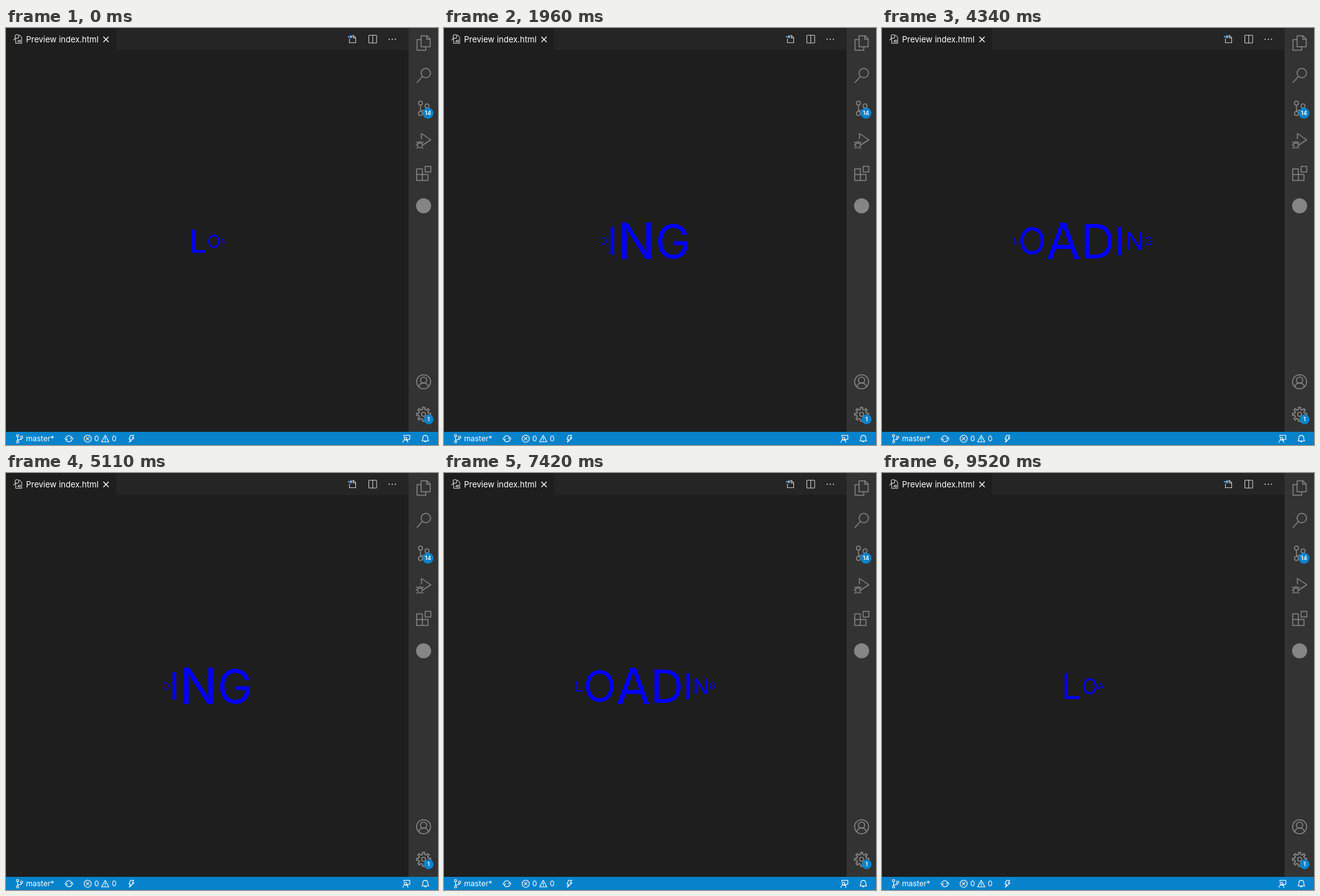
Write an HTML page that moves like this. It is 690 px wide and 666 px high and loops after 9.59 s.

```html
<!DOCTYPE html>
<html lang="en">
<head>
<meta charset="utf-8">
<title>Loading</title>
<style>
  html, body { margin: 0; width: 100%; height: 100%; overflow: hidden; background: #1e1e1e; }
  svg { display: block; width: 690px; height: 666px; font-family: Inter, "Open Sans", sans-serif; }
  .icon { fill: none; stroke-linecap: round; stroke-linejoin: round; }
  .side { stroke: #858585; stroke-width: 1.5; }
  .tool { stroke: #c9c9c9; stroke-width: 1.1; stroke-linecap: butt; }
  .status { stroke: #fff; stroke-width: 1.1; }
  .badge { fill: #0783cb; }
  .count { fill: #fff; font-size: 9px; font-weight: 600; text-anchor: middle; }
  #word { fill: #00f; text-anchor: middle; text-rendering: geometricPrecision; }
</style>
</head>
<body>
<svg viewBox="0 0 690 666">
  <rect width="690" height="666" fill="#1e1e1e"/>
  <rect x="176" width="467" height="35" fill="#252526"/>
  <rect x="643" width="47" height="645" fill="#333"/>
  <rect y="645" width="690" height="21" fill="#0783cb"/>

  <!-- tab -->
  <text x="32" y="23" font-size="13" fill="#fff">Preview index.html</text>
  <g class="icon tool">
    <path d="M15.5 16V24.5H25V15L22 11.5H20M18 22.5L20 20M20.5 19.5H23V22.5H20.5Z"/>
    <circle cx="17.5" cy="13.5" r="3"/>
    <path d="M15.5 16L12 19.5"/>
    <path d="M155.5 14L164 22.5M164 14L155.5 22.5" stroke="#fff" stroke-width="1.3"/>
  </g>

  <!-- toolbar -->
  <g class="icon tool">
    <path d="M548.5 17V23.5H558.5V15.5L555 12H553M554.5 12V16H558.5"/>
    <path d="M546 14H552.5M550 11.5L552.5 14L550 16.5" stroke="#75beff" stroke-width="1.4"/>
    <rect x="579.5" y="11.5" width="12.5" height="12.5" rx="1"/>
    <path d="M585.75 11.5V24"/>
  </g>
  <g fill="#c9c9c9">
    <circle cx="612" cy="18" r="1.1"/><circle cx="617" cy="18" r="1.1"/><circle cx="622" cy="18" r="1.1"/>
  </g>

  <!-- activity bar -->
  <g class="icon side">
    <path d="M663 12.5H672.5L677.5 17.5V30H663ZM672 12.5V18H677.5M663 18.5H656.5V35.5H670.5V30"/>
    <circle cx="670.5" cy="72" r="7.5"/><path d="M665 77.5L656.5 87"/>
    <circle cx="662" cy="120" r="3.2"/><circle cx="662" cy="136.5" r="3.2"/><circle cx="672.5" cy="124.5" r="3.2"/>
    <path d="M662 123.2V133.3M672.5 127.7Q672 131.5 668 131.5H666Q662.5 131.5 662 133.3"/>
    <path d="M663.5 177V168.5L678.5 178.5L667 186"/>
    <path d="M657.5 184H664.5V187.5A3.5 4 0 0 1 657.5 187.5ZM658.5 184A2.5 2.7 0 0 1 663.5 184M655.5 182L657.5 184M666.5 182L664.5 184M655 187H657.5M664.5 187H667M656 192L658.3 190M666 192L663.7 190" stroke-width="1.3"/>
    <path d="M656 225H665V234H674V243.5H656ZM656 234H665V243.5M669.5 221H678.5V230H669.5Z"/>
    <circle cx="667" cy="565" r="11.2"/><circle cx="667" cy="562.5" r="5"/>
    <path d="M659.5 573A7.6 7.6 0 0 1 674.5 573"/>
    <circle cx="667" cy="617" r="3.2"/><path id="gear" stroke-width="1.8"/>
  </g>
  <circle cx="667" cy="284" r="12" fill="#858585"/>
  <circle class="badge" cx="674" cy="136" r="8.7"/><text class="count" x="674" y="139.3">14</text>
  <circle class="badge" cx="675" cy="625" r="7.8"/><text class="count" x="675" y="628.3">1</text>

  <!-- status bar -->
  <g fill="#fff" font-size="12">
    <text x="32" y="660">master*</text><text x="141" y="660">0</text><text x="169" y="660">0</text>
  </g>
  <g class="icon status">
    <circle cx="18.5" cy="651" r="1.8"/><circle cx="18.5" cy="661" r="1.8"/><circle cx="25" cy="653.5" r="1.8"/>
    <path d="M18.5 652.8V659.2M25 655.3Q24.5 657.5 21.5 657.5Q19 657.5 18.5 659.2"/>
    <path d="M95.5 655A5 5 0 0 1 105 654.5M105.5 657A5 5 0 0 1 96 657.7M103 656L105.5 654L107 656.5M94 655.5L96 658L98 656"/>
    <circle cx="130.5" cy="656" r="5.7"/><path d="M128.3 653.8L132.7 658.2M132.7 653.8L128.3 658.2"/>
    <path d="M158.5 650.5L164.3 661H152.7ZM158.5 654.3V657.6M158.5 659.2V659.4"/>
    <path d="M199 650.5H204L201.7 654.5H204.5L197 661.5L199 656.8H196.5Z"/>
    <path d="M635.5 652.5V650.5H645V657H642.5L640.5 659V657"/>
    <circle cx="638" cy="655.5" r="2"/><path d="M634 662A4 4 0 0 1 642 662"/>
    <path d="M664.5 659.5H675L673.7 657V654A4 4 0 0 0 665.8 654V657ZM668.3 659.8A1.5 1.5 0 0 0 671.2 659.8"/>
  </g>

  <text id="word" x="321.5" y="340.3"></text>
</svg>
<script>
const STEP = 70, LOOP = 9590;
const CYCLE = 45, DELAY = 3.75;         // in steps
const START = -13.05, RISE = 22.5, FALL = 10.5;
const PEAK = 80, HALF_CAP = 0.3636;
const SVG_NS = "http://www.w3.org/2000/svg";

const word = document.getElementById("word");
const letters = [..."LOADING"].map(char => {
  const span = document.createElementNS(SVG_NS, "tspan");
  span.textContent = char;
  word.append(span);
  return span;
});

document.getElementById("gear").setAttribute("d", gearPath(667, 617, 8, 11.3, 8));

function gearPath(cx, cy, inner, outer, teeth) {
  const points = [];
  for (let i = 0; i < teeth; i++) {
    for (const [offset, r] of [[-0.27, inner], [-0.18, outer], [0.18, outer], [0.27, inner]]) {
      const a = (i + offset) * 2 * Math.PI / teeth;
      points.push((cx + r * Math.cos(a)).toFixed(2) + " " + (cy + r * Math.sin(a)).toFixed(2));
    }
  }
  return "M" + points.join("L") + "Z";
}

// cubic-bezier(.42, 0, .58, 1)
function easeInOut(x) {
  let lo = 0, hi = 1, u = 0.5;
  for (let i = 0; i < 24; i++) {
    u = (lo + hi) / 2;
    const bx = 3 * u * (1 - u) * (0.42 * (1 - u) + 0.58 * u) + u ** 3;
    if (bx < x) lo = u; else hi = u;
  }
  return u * u * (3 - 2 * u);
}

function letterSize(step) {
  const p = ((step - START) % CYCLE + CYCLE) % CYCLE;
  if (p < RISE) return PEAK * easeInOut(p / RISE);
  if (p < RISE + FALL) return PEAK * (1 - easeInOut((p - RISE) / FALL));
  return 0;
}

function draw(time) {
  const step = Math.floor((time % LOOP) / STEP);
  let shift = 0;
  letters.forEach((span, i) => {
    const size = letterSize(step - i * DELAY);
    const visible = size > 0.5;
    span.style.display = visible ? "" : "none";
    if (!visible) return;
    const drop = size * HALF_CAP;
    span.setAttribute("font-size", size.toFixed(2));
    span.setAttribute("dy", (drop - shift).toFixed(2));
    shift = drop;
  });
}

const begin = performance.now();
function tick() {
  draw(performance.now() - begin);
  requestAnimationFrame(tick);
}
tick();
</script>
</body>
</html>
```
